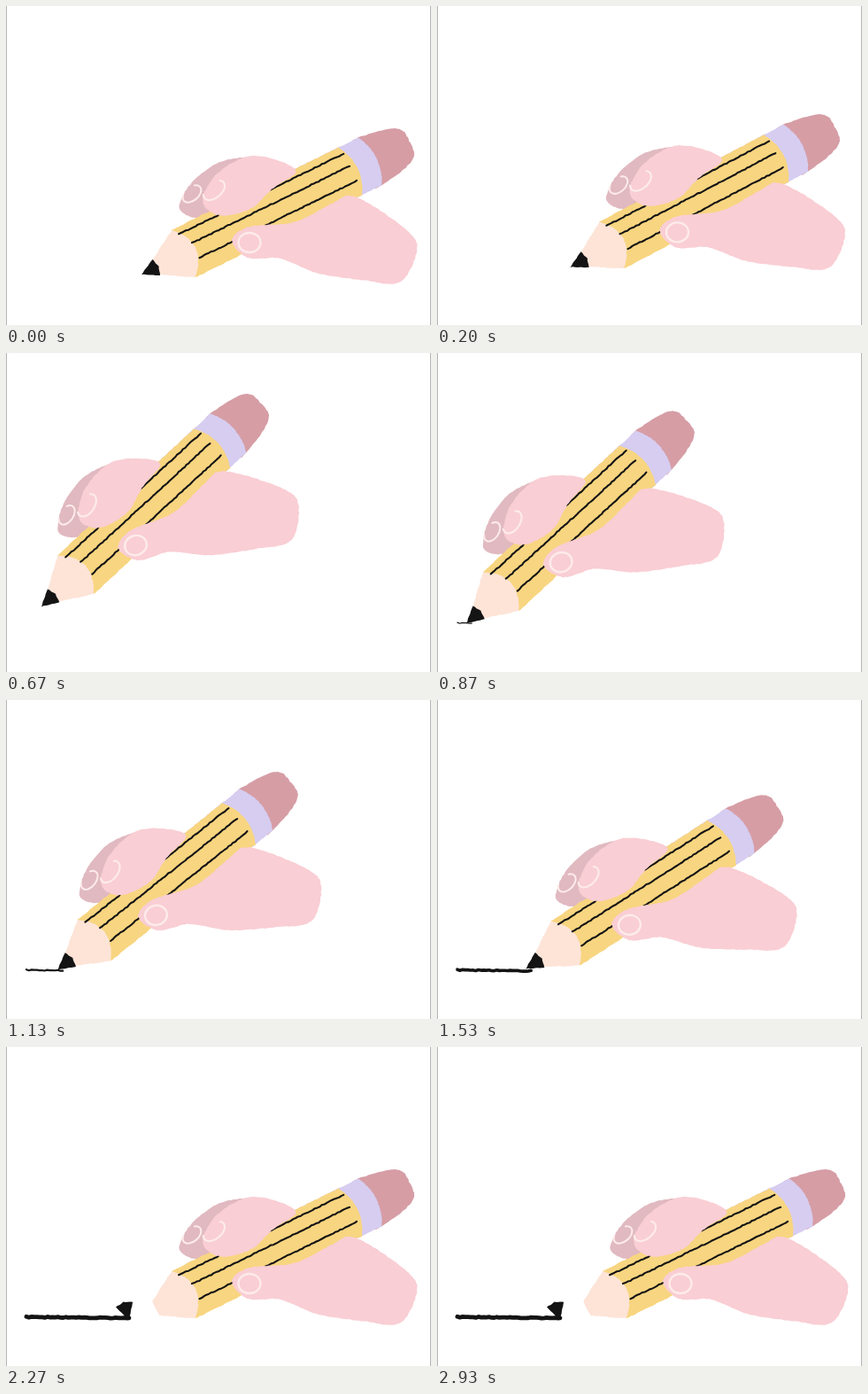
An HTML page with a canvas that plays this animation: 480 by 360 pixels, repeating every 2.99 s.

```html
<!DOCTYPE html>
<html lang="en">
<head>
<meta charset="utf-8">
<title>Pencil line</title>
<style>
html, body { margin: 0; width: 100%; height: 100%; overflow: hidden; background: #fff; }
canvas { display: block; width: 480px; height: 360px; }
</style>
</head>
<body>
<canvas id="stage" width="480" height="360"></canvas>
<script>
const ctx = document.getElementById('stage').getContext('2d');
const LOOP = 2990, LAST = 44, ARRIVE = 12, BREAK = 28, REST = 32;
const PINK = '#f9ced4', NAIL = '#fdebea', INK = '#141414';
const PENCIL_ANGLE = -26.3;

const rad = deg => deg * Math.PI / 180;
const lerp = (a, b, u) => a + (b - a) * u;
const clamp = u => Math.max(0, Math.min(1, u));
const ease = u => 0.5 - 0.5 * Math.cos(Math.PI * clamp(u));

let seed = 7;
function rand() {
  seed = (seed * 16807) % 2147483647;
  return seed / 2147483647 - 0.5;
}

// Closed shape with a slightly rough edge; bend 0 gives straight sides
function trace(pts, bend = 0) {
  const path = new Path2D(), n = pts.length, at = i => pts[(i + n) % n];
  pts.forEach((p, i) => {
    const q = at(i + 1), before = at(i - 1), after = at(i + 2);
    const steps = Math.ceil(Math.hypot(q[0] - p[0], q[1] - p[1]) / 3);
    for (let s = 0; s < steps; s++) {
      const u = s / steps, v = 1 - u;
      const [x, y] = [0, 1].map(d => {
        const c1 = p[d] + bend * (q[d] - before[d]) / 3;
        const c2 = q[d] - bend * (after[d] - p[d]) / 3;
        return bend
          ? v * v * v * p[d] + 3 * v * v * u * c1 + 3 * v * u * u * c2 + u * u * u * q[d]
          : lerp(p[d], q[d], u);
      });
      path.lineTo(x + rand() * 0.8, y + rand() * 0.8);
    }
  });
  path.closePath();
  return path;
}

function roughLine(x1, y1, x2, y2) {
  const path = new Path2D(), steps = Math.ceil((x2 - x1) / 3);
  for (let i = 0; i <= steps; i++) {
    path.lineTo(lerp(x1, x2, i / steps), lerp(y1, y2, i / steps) + rand());
  }
  return path;
}

function nail(x, y, rx, ry, tilt, gap) {
  const path = new Path2D();
  path.ellipse(x, y, rx, ry, rad(tilt), -gap, Math.PI + gap);
  return path;
}

// Pencil parts lie along the x axis, nib at 0; each ends in a bulging edge
function bow(x, depth, power = 2) {
  return Array.from({ length: 21 }, (_, i) => {
    const v = i / 10 - 1;
    return [x + depth * (1 - Math.abs(v) ** power), v * 30];
  });
}
const part = (color, x, half, edge) =>
  ({ color, path: trace([[x, half], [x, -half], ...edge]) });

const pencil = [
  part('#d69da5', 280, 30, bow(288, 50, 5)),
  part('#d6cdf1', 200, 30, bow(288, 8)),
  part('#f8d580', 53, 30, bow(263, 9)),
  part('#fde4d7', 18, 9, bow(53, 15)),
  ...[[58, -22], [67, -6.5], [67, 12]].map(([x, y]) =>
    ({ color: INK, width: 2.1, path: roughLine(x, y, 265, y + 1) }))
];
const lead = { color: INK, path: trace([[0, 0], [18.5, -9.5], [21.5, 0], [18.5, 10]]) };

const farFinger = [
  { color: '#e1b9c0', path: trace([[196, 223], [214, 195], [248, 174], [290, 176], [270, 225], [228, 239], [204, 236]], 0.5) },
  { color: NAIL, width: 2, path: nail(210, 212, 12, 7.5, -40, 0.8) }
];
const nearFingers = [
  { color: PINK, path: trace([[222, 219], [240, 188], [280, 169], [327, 185], [300, 207], [276, 229], [240, 236]], 0.5) },
  { color: NAIL, width: 2.2, path: nail(235, 208, 14, 8.5, -40, 0.5) },
  { color: PINK, path: trace([[255, 264], [275, 249], [325, 244], [366, 224], [390, 214], [430, 236], [464, 268], [446, 311], [400, 309], [350, 301], [310, 285], [273, 284]], 0.45) },
  { color: NAIL, width: 2.4, path: nail(275, 267, 12.5, 11, 0, Math.PI / 2) }
];

function paint({ color, width, path }) {
  ctx.fillStyle = ctx.strokeStyle = color;
  ctx.lineWidth = width;
  if (width) ctx.stroke(path);
  else ctx.fill(path);
}

function within(x, y, deg, body) {
  ctx.save();
  ctx.translate(x, y);
  ctx.rotate(rad(deg));
  body();
  ctx.restore();
}

// Place of the thumb nail and tilt of the hand
function pose(k) {
  if (k < ARRIVE) {
    const p = clamp((k - 2) / 10), u = ease(p);
    return {
      x: lerp(275, 133, u),
      y: lerp(267, 234.5, u) - 35 * Math.sin(Math.PI * p),
      tilt: -17.4 * ease((k - 1) / 10.5)
    };
  }
  const q = clamp((k - ARRIVE) / (REST - ARRIVE));
  const u = q + 0.6 * q ** 3 * (1 - q);
  return {
    x: lerp(133, 275, u),
    y: lerp(234.5, 267, u),
    tilt: -17.4 * clamp(1 - u) ** 1.1
  };
}

function drawLine(k, nib) {
  const end = k < BREAK ? nib + 6 : 139;
  const width = Math.min(4.8, 1 + (k - ARRIVE) * 0.24);
  seed = 53;
  paint({ color: INK, width, path: roughLine(23, 304.7, end, 305 + clamp((k - ARRIVE) / 14)) });
}

function drawHand(k, { x, y, tilt }) {
  within(x, y, tilt, () => {
    ctx.translate(-275, -267);
    farFinger.forEach(paint);
    within(153, 303, PENCIL_ANGLE, () => {
      pencil.forEach(paint);
      if (k < BREAK) paint(lead);
    });
    nearFingers.forEach(paint);
  });
}

// The snapped lead topples over on the end of the line
function drawBrokenLead(k) {
  const fall = clamp((k - BREAK) / 5) ** 2;
  within(135, 296, -28 - 80 * fall, () => {
    ctx.translate(-13, 0);
    paint(lead);
  });
}

function draw(k) {
  const hand = pose(k);
  ctx.fillStyle = '#fff';
  ctx.fillRect(0, 0, 480, 360);
  ctx.lineJoin = ctx.lineCap = 'round';

  if (k >= ARRIVE) drawLine(k, hand.x + 127.2 * Math.cos(rad(hand.tilt + 163.6)));
  drawHand(k, hand);
  if (k >= BREAK) drawBrokenLead(k);

  ctx.fillStyle = '#b4b4b4';
  ctx.fillRect(0, 0, 1, 360);
  ctx.fillRect(479, 0, 1, 360);
}

// Fifteen frames a second, each start rounded to 10 ms
function frameAt(t) {
  let k = Math.floor((t + 4) * 15 / 1000);
  if (Math.round(k * 20 / 3) * 10 > t) k--;
  return Math.min(LAST, Math.max(0, k));
}

let start = null;
function tick(now) {
  if (start === null) start = now;
  draw(frameAt((now - start) % LOOP));
  requestAnimationFrame(tick);
}
draw(0);
requestAnimationFrame(tick);
</script>
</body>
</html>
```
